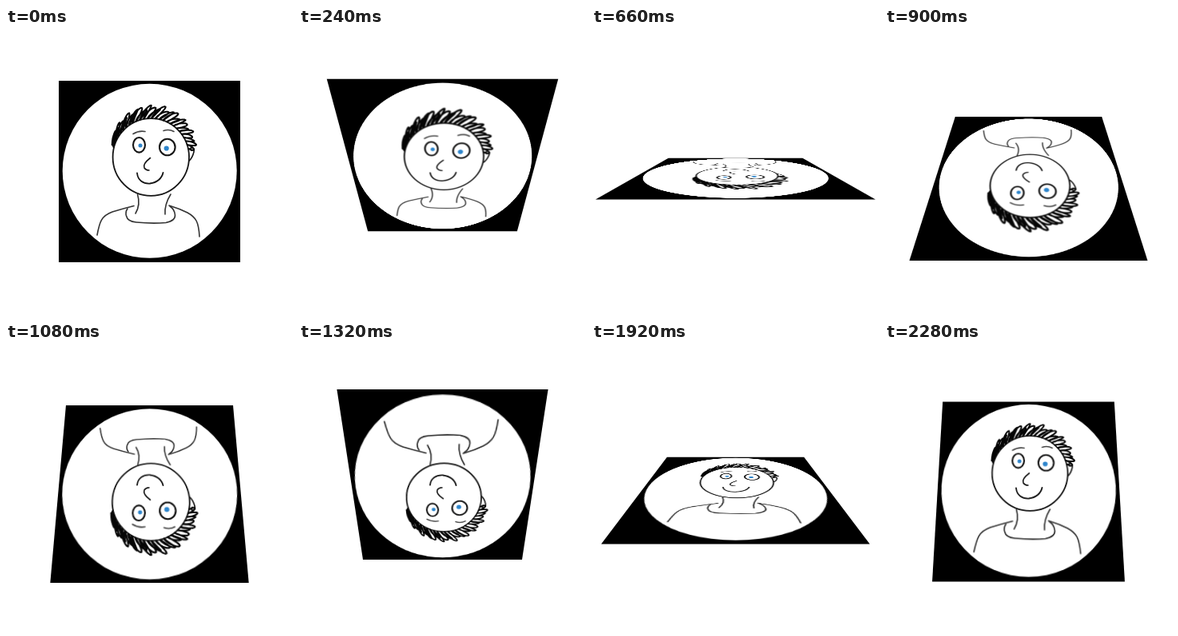
These frames come from a looping animation (359 px wide and 359 px high, 2.34 s). An HTML page:

```html
<!DOCTYPE html>
<html lang="en">
<head>
<meta charset="utf-8">
<title>Flipping portrait</title>
<style>
  html, body { margin: 0; width: 100%; height: 100%; overflow: hidden; background: #fff; }
  #card { position: absolute; left: 66px; top: 66px; width: 227px; height: 227px; }
  .line { fill: none; stroke: #151515; stroke-width: 1.6; stroke-linecap: round; stroke-linejoin: round; }
  .soft { filter: blur(.45px); }
</style>
</head>
<body>
<svg id="card" viewBox="66 66 227 227">
  <path d="M66 66h227v227H66z"/>
  <circle cx="179.7" cy="178.8" r="109" fill="#fff"/>
  <g class="soft">
    <g class="line">
      <!-- shoulders, collar, neck -->
      <g stroke="#333">
        <path d="M114 259C117 243 119 235 133 230Q146 226 160 222.500"/>
        <path d="M242 261C241 243 238 237 227 231Q217 226 204 222"/>
        <path d="M152 226Q149 230 150.500 235Q152 242 163 243Q183 245 200 243.500Q212 241 211.500 234Q211 227 205 223"/>
        <path d="M164.500 208Q168.500 221 162 232M206 208Q198 221 199 233"/>
      </g>
      <!-- head and ear -->
      <ellipse cx="181.300" cy="161.500" rx="47.700" ry="48.300" stroke-width="1.800"/>
      <path d="M230 151Q236 147 235 155Q233 163 229 166"/>
      <!-- face -->
      <path d="M159 132.500Q166 128 174 129.500M197 128.500Q204 126 210 129.500" stroke="#444"/>
      <ellipse cx="166.500" cy="146.300" rx="7.500" ry="9.300" stroke-width="2.100"/>
      <ellipse cx="201.800" cy="149" rx="9.800" ry="10.300" stroke-width="2.100"/>
      <path d="M180.500 162.500C176 166 171 171 173 175Q175 178 179 178"/>
      <path d="M164 181.500C165 191 172 195 180 194.500C189 193.500 195 188 196.500 181" stroke-width="1.800"/>
      <path id="hair" stroke="#050505" stroke-width="2"/>
    </g>
    <g fill="#2f86cc">
      <circle cx="168" cy="147" r="2.500"/>
      <circle cx="200.700" cy="150.500" r="3.100"/>
    </g>
  </g>
</svg>
<script>
const FRAME = 60, FRAMES = 39, LOOPS = 27, SAMPLES = 14;
const card = document.getElementById('card');

function polar(degrees, radius) {
  const a = degrees * Math.PI / 180;
  return (181 + radius * Math.cos(a)).toFixed(1) + ' ' + (161 + radius * Math.sin(a)).toFixed(1);
}

// Scribbled coil of slanted loops around the top of the head
const points = [];
for (let i = 0; i <= LOOPS * SAMPLES; i++) {
  const k = i / (LOOPS * SAMPLES), phase = 2 * Math.PI * LOOPS * k;
  const height = (2.5 + 4 * Math.sin(Math.PI * k) + 1.5 * k) * (1 + 0.2 * Math.sin(phase * 0.37));
  const lean = 10 - 7 * k;
  points.push(polar(200 + 152 * k + lean * Math.sin(phase - 0.3), 48 + height * (1 + Math.sin(phase))));
}
document.getElementById('hair').setAttribute('d', 'M' + points.join('L'));

const start = performance.now();
function draw() {
  const step = Math.floor((performance.now() - start) / FRAME) % FRAMES;
  card.style.transform = `perspective(316px) rotateX(${-360 * step / FRAMES}deg)`;
  requestAnimationFrame(draw);
}
draw();
</script>
</body>
</html>
```
